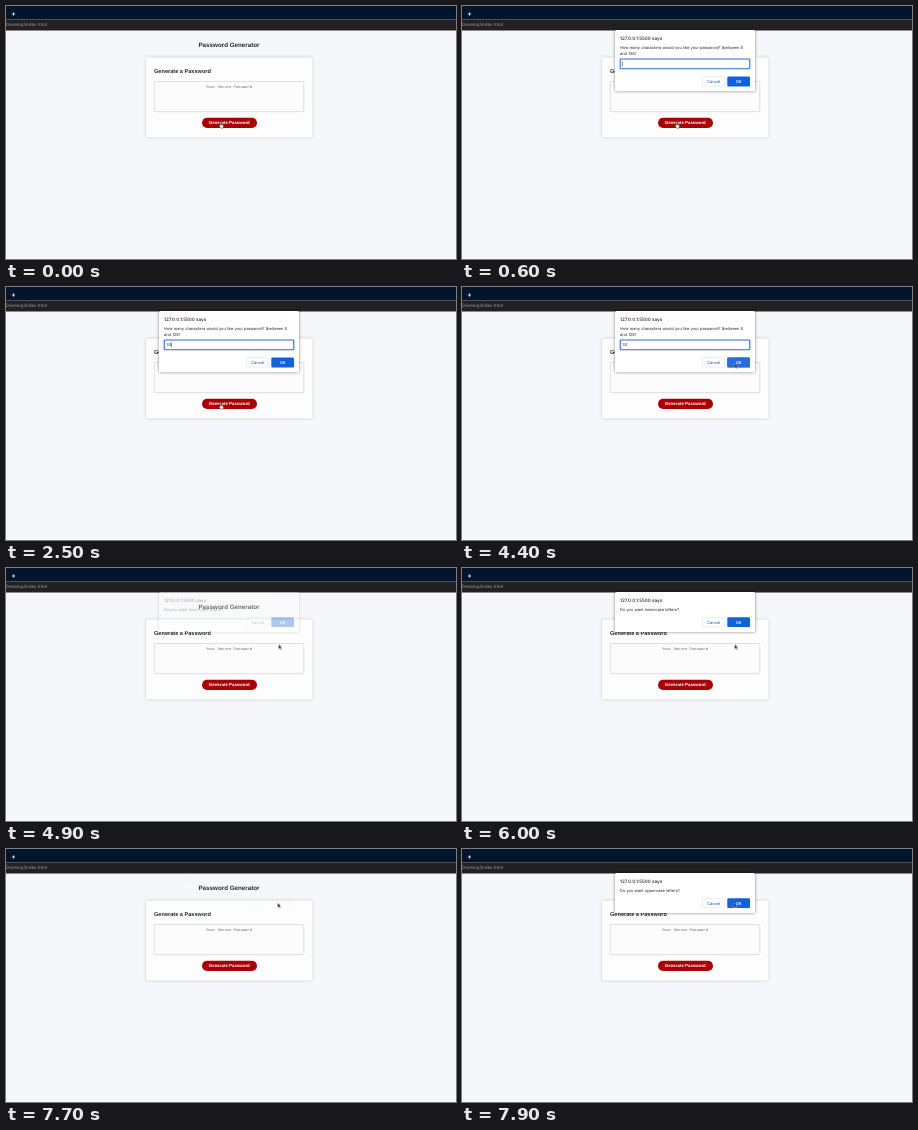
Recreate the animation shown at these times as an HTML page. Size 450 px wide and 253 px high, loop 8 s.

```html
<!DOCTYPE html>
<html lang="en">
<head>
<meta charset="utf-8">
<title>Password Generator</title>
<style>
  html, body { margin: 0; height: 100%; overflow: hidden; background: #f5f7fa; }
  svg { display: block; width: 100%; height: 100%; }
  text { font-family: Inter, Roboto, sans-serif; font-size: 4px; fill: #222428; text-rendering: geometricPrecision; }
  .page { font-family: "Liberation Sans", Arial, sans-serif; font-weight: 700; fill: #242832; }
  .mono { font-family: "Liberation Mono", monospace; font-size: 3.83px; fill: #66666a; }
  .mid { text-anchor: middle; }
  .host { font-size: 4.6px; font-weight: 500; }
  .cancel { fill: #2b6cd0; font-weight: 500; }
  .ok { fill: #fff; font-weight: 600; }
  .card { filter: drop-shadow(0 .7px 1.6px rgba(0, 0, 0, .2)); }
  .sheet { filter: drop-shadow(0 .8px 1.8px rgba(0, 0, 0, .5)); }

  /* One shared 8 s clock: 1.25% is 100 ms */
  .anim { animation: 8s linear infinite; }
  .step { animation: 8s step-end infinite; }
  #ask-length { animation-name: ask-length; }
  #ask-lower { animation-name: ask-lower; }
  #ask-upper { animation-name: ask-upper; }
  #caret-empty { animation-name: caret-empty; }
  #caret-typed { animation-name: caret-typed; }
  #digit-a { animation-name: digit-a; }
  #digit-b { animation-name: digit-b; }
  #hand { animation-name: hand; }
  #arrow { animation-name: arrow-show; }
  #arrow-path { animation-name: arrow-path; }
  #hover-length { animation-name: hover-length; }
  #hover-lower { animation-name: hover-lower; }

  @keyframes ask-length { 0%, 2.5% { opacity: 0 } 7.5%, 57.5% { opacity: 1 } 60%, 100% { opacity: 0 } }
  @keyframes ask-lower { 0%, 60% { opacity: 0 } 63.75%, 93.75% { opacity: 1 } 96.25%, 100% { opacity: 0 } }
  @keyframes ask-upper { 0%, 96.25% { opacity: 0 } 98.5%, 100% { opacity: 1 } }
  @keyframes caret-empty { 0% { opacity: 0 } 6.25% { opacity: 1 } 12.5% { opacity: 0 } 18.75% { opacity: 1 } 25%, 100% { opacity: 0 } }
  @keyframes caret-typed { 0% { opacity: 0 } 31.25% { opacity: 1 } 37.5% { opacity: 0 } 43.75% { opacity: 1 } 50% { opacity: 0 } 56.25%, 100% { opacity: 1 } }
  @keyframes digit-a { 0% { opacity: 0 } 30%, 100% { opacity: 1 } }
  @keyframes digit-b { 0% { opacity: 0 } 31.25%, 100% { opacity: 1 } }
  @keyframes hand { 0% { opacity: 1 } 46.25%, 100% { opacity: 0 } }
  @keyframes arrow-show { 0% { opacity: 0 } 46.25%, 100% { opacity: 1 } }
  @keyframes arrow-path {
    0%, 45% { transform: translate(214.5px, 117px); animation-timing-function: ease-in-out }
    55%, 78.75% { transform: translate(272.6px, 76.3px); animation-timing-function: ease-in-out }
    88.75%, 100% { transform: translate(271.6px, 53.8px) }
  }
  @keyframes hover-length { 0% { opacity: 0 } 53.75%, 100% { opacity: 1 } }
  @keyframes hover-lower { 0% { opacity: 0 } 86.25%, 100% { opacity: 1 } }
</style>
</head>
<body>
<svg viewBox="0 0 450 253" preserveAspectRatio="none">
  <defs>
    <g id="actions">
      <rect x="240.4" y="49.4" width="22.6" height="9.4" rx="1.2" fill="#fff" stroke="#dcdfe5" stroke-width=".6"/>
      <text class="cancel mid" x="251.7" y="55.5">Cancel</text>
      <rect x="265.3" y="49.2" width="22.7" height="9.9" rx="1.2" fill="#1261dc"/>
    </g>
    <rect id="hover" x="265.3" y="49.2" width="22.7" height="9.9" rx="1.2" fill="#2b6bdc"/>
    <text id="ok" class="ok mid" x="276.7" y="55.5">OK</text>
    <g id="short-sheet">
      <rect class="sheet" x="153" y="24" width="140" height="40" rx="1.5" fill="#fff"/>
      <text class="host" x="158" y="33.5">127.0.0.1:5500 says</text>
      <use href="#actions"/>
    </g>
  </defs>

  <rect width="450" height="253" fill="#f5f7fa"/>
  <rect width="450" height="13.5" fill="#01162d"/>
  <rect y="13.5" width="450" height="11" fill="#222021"/>
  <path d="M5.8 8H9.2M7.5 6.3V9.7" stroke="#e8edf2" stroke-width=".8"/>
  <text x="0" y="20.4" style="font-size:4.5px;fill:#a09c9c">Develop/index.html</text>

  <text class="page mid" x="223" y="40.8" style="font-size:6.25px">Password Generator</text>
  <rect class="card" x="140" y="51.5" width="166.5" height="80" rx="1" fill="#fdfdfd"/>
  <text class="page" x="148" y="67.2" style="font-size:5.6px">Generate a Password</text>
  <rect x="148.3" y="75.5" width="149.5" height="30.2" rx=".8" fill="#fcfcfc" stroke="#d6d2d6" stroke-width=".7"/>
  <text class="mono mid" x="223" y="82.4">Your Secure Password</text>
  <rect x="196" y="111.8" width="55" height="10.2" rx="5.1" fill="#a90006"/>
  <text class="page mid" x="223.3" y="118.4" style="font-size:4.4px;fill:#fff">Generate Password</text>

  <g id="ask-length" class="anim">
    <rect class="sheet" x="153" y="24" width="140" height="61.3" rx="1.5" fill="#fff"/>
    <text class="host" x="158" y="33.5">127.0.0.1:5500 says</text>
    <text x="158" y="42.6">How many characters would you like your password? (between 8</text>
    <text x="158" y="48.9">and 128)</text>
    <rect x="158.2" y="53" width="129.6" height="9.8" rx=".8" fill="#fff" stroke="#2d6cd8" stroke-width="1.1"/>
    <text id="digit-a" class="step" x="160.3" y="59.4">3</text>
    <text id="digit-b" class="step" x="162.8" y="59.4">0</text>
    <rect id="caret-empty" class="step" x="160.3" y="55.3" width=".5" height="5" fill="#222"/>
    <rect id="caret-typed" class="step" x="165.4" y="55.3" width=".5" height="5" fill="#222"/>
    <g transform="translate(0 21.3)">
      <use href="#actions"/>
      <use id="hover-length" class="step" href="#hover"/>
      <use href="#ok"/>
    </g>
  </g>

  <g id="ask-lower" class="anim">
    <use href="#short-sheet"/>
    <text x="158" y="42.6">Do you want lowercase letters?</text>
    <use id="hover-lower" class="step" href="#hover"/>
    <use href="#ok"/>
  </g>

  <g id="ask-upper" class="anim">
    <use href="#short-sheet"/>
    <text x="158" y="42.6">Do you want uppercase letters?</text>
    <use href="#ok"/>
  </g>

  <path id="hand" class="step" d="M214.2 116.9q.7-.6 1.1.2v1.5l1.7.4q.7.3.5 1.2l-.4 2h-2.6l-1.5-2.3q-.1-.8.7-.5l.5.4z"
        fill="#fff" stroke="#222" stroke-width=".45"/>
  <g id="arrow" class="step">
    <path id="arrow-path" class="anim" d="M0 0V4.6L1.1 3.7L1.9 5.5L2.8 5.1L2 3.4H3.4Z"
          fill="#111" stroke="#fff" stroke-width=".35"/>
  </g>
</svg>
</body>
</html>
```
